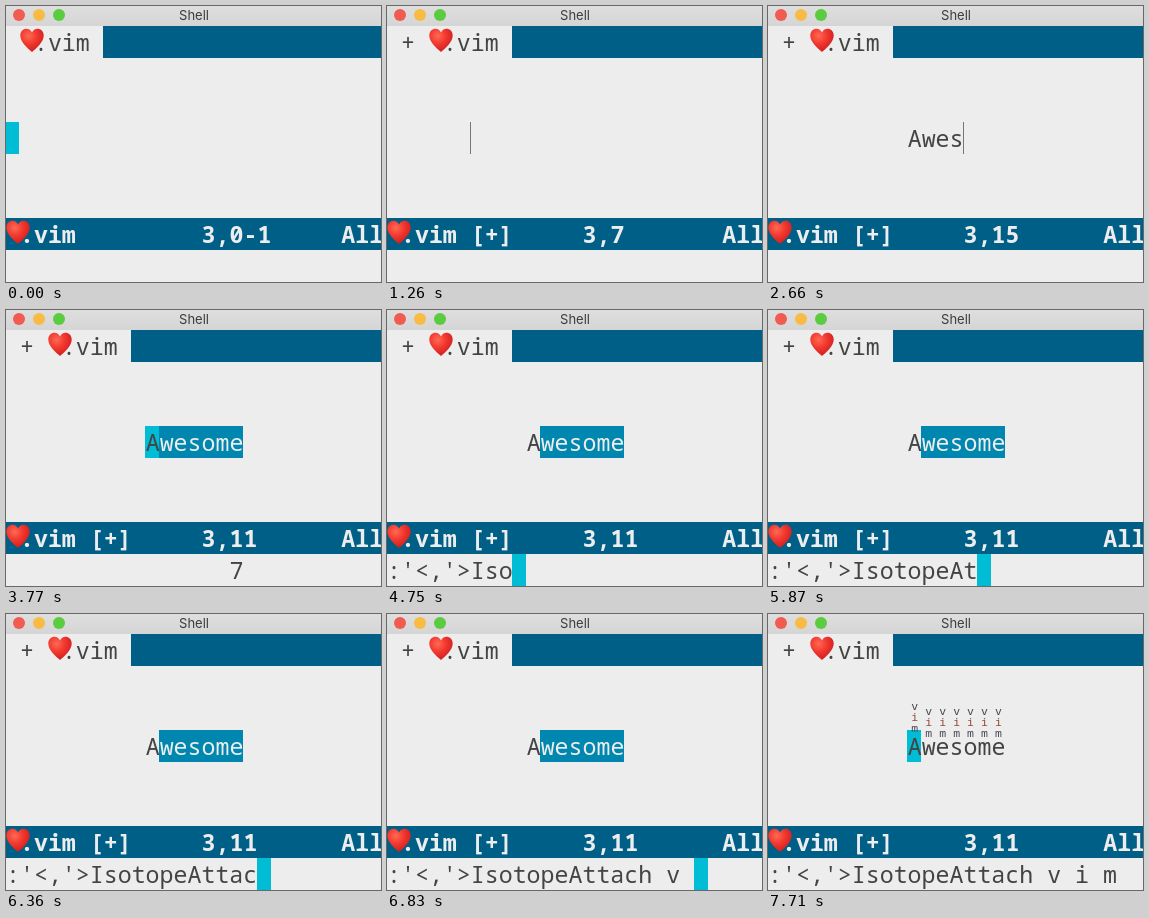
Write an HTML page that moves like this. It is 375 px wide and 276 px high and loops after 8000 ms.

```html
<!DOCTYPE html>
<html lang="en">
<head>
<meta charset="utf-8">
<title>Shell</title>
<style>
html, body { margin: 0; width: 100%; height: 100%; overflow: hidden; background: #ededed; }
svg { display: block; width: 375px; height: 276px; }
text { white-space: pre; fill: #444; }
.mono { font: 300 23.28px "Noto Sans Mono", monospace; }
.bold { font-weight: 700; }
.light { fill: #ededed; }
.title { font: 13px Inter, sans-serif; text-anchor: middle; fill: #3c3c3c; }
.mark { font: 11.5px "Noto Sans Mono", monospace; text-anchor: middle; }
</style>
</head>
<body>
<svg viewBox="0 0 375 276">
  <defs>
    <linearGradient id="bar" x2="0" y2="1">
      <stop stop-color="#dedede"/><stop offset="1" stop-color="#d5d5d5"/>
    </linearGradient>
    <radialGradient id="red" cx=".36" cy=".3" r=".75">
      <stop stop-color="#ff6a55"/><stop offset=".45" stop-color="#f23a30"/><stop offset="1" stop-color="#cf1a1c"/>
    </radialGradient>
    <path id="heart" fill="url(#red)" d="M12 24C8 20.500 .3 14.500 .3 7.500C.3 3.500 3.300 .8 6.500 .8C9 .8 11 2.300 12 4.500C13 2.300 15 .8 17.500 .8C20.700 .8 23.700 3.500 23.700 7.500C23.700 14.500 16 20.500 12 24Z"/>
  </defs>
  <rect width="375" height="276" fill="#ededed"/>
  <rect width="375" height="20" fill="url(#bar)"/>
  <circle cx="13" cy="9" r="6" fill="#f15b51"/>
  <circle cx="33" cy="9" r="6" fill="#f8bb45"/>
  <circle cx="53" cy="9" r="6" fill="#5bcb40"/>
  <text class="title" x="188" y="14">Shell</text>
  <g id="screen"></g>
</svg>
<script>
(() => {
  const LOOP = 8000, CELL = 13.97, ROW = 32, TOP = 20;
  const BLUE = "#005f87", SELECT = "#0087af", CURSOR = "#00bcd4";
  const WORD = "Awesome", COMMAND = "IsotopeAttach v i m";
  const BUFFER = 3, STATUS = 6, PROMPT = 7;

  // Evenly spaced key times, both ends included
  const keys = (from, to, n) =>
    Array.from({ length: n }, (_, i) => from + (to - from) * i / (n - 1));
  const indentKeys = [840, 1050, 1260, 1490, 1730];
  const wordKeys = [...keys(2180, 2660, 4), ...keys(2720, 2960, 3)];
  const commandKeys = [
    ...keys(4450, 4750, 3), ...keys(4960, 5280, 4), 5600, 5870,
    ...keys(6010, 6830, 7), ...keys(7010, 7360, 3)
  ];
  const INSERT = 570, ESCAPE = 3410, VISUAL = 3590, BACK = 3770, COLON = 4180, RUN = 7710;
  const pressed = (list, t) => list.filter(k => t >= k - 0.01).length;

  const colX = col => Math.floor(col * CELL);
  const rowY = row => TOP + row * ROW;

  function fill(row, from, to, color) {
    const x = colX(from);
    return `<rect x="${x}" y="${rowY(row)}" width="${colX(to) - x}" height="${ROW}" fill="${color}"/>`;
  }

  function write(row, col, str, style = "") {
    const safe = str.replace(/</g, "&lt;").replace(/>/g, "&gt;");
    return `<text class="mono ${style}" x="${col * CELL}" y="${rowY(row) + 25}">${safe}</text>`;
  }

  function fileName(row, col, style) {
    return `<use href="#heart" x="${Math.round(col * CELL)}" y="${rowY(row) + 2}"/>` +
      write(row, col + 1, ".vim", style);
  }

  // Small letters stacked above each character of the word
  function marks() {
    const colors = ["#444", "#96503f", "#4a4654"];
    let out = "";
    for (let i = 0; i < WORD.length; i++) {
      const base = i ? 101 : 96;
      [..."vim"].forEach((c, j) => {
        out += `<text class="mark" x="${(10.5 + i) * CELL}" y="${base + j * 11}" style="fill:${colors[j]}">${c}</text>`;
      });
    }
    return out;
  }

  function tabLine(edited) {
    return fill(0, edited ? 9 : 7, 27, BLUE) +
      (edited ? write(0, 1, "+") : "") + fileName(0, edited ? 3 : 1);
  }

  function statusLine(edited, pos) {
    const style = "bold light";
    return fill(STATUS, 0, 27, BLUE) + fileName(STATUS, 0, style) +
      (edited ? write(STATUS, 6, "[+]", style) : "") +
      write(STATUS, 14, pos, style) + write(STATUS, 24, "All", style);
  }

  function buffer(t, col, typed) {
    const text = WORD.slice(0, typed);
    let out = "";
    if (t < INSERT || (t >= ESCAPE && t < COLON) || t >= RUN) {
      out += fill(BUFFER, col, col + 1, CURSOR);
    } else if (t < ESCAPE && col) {
      out += `<rect x="${colX(col)}" y="${rowY(BUFFER)}" width="1" height="${ROW}" fill="#777"/>`;
    }
    if (t >= BACK && t < RUN) {
      out += fill(BUFFER, 11, 17, SELECT) + write(BUFFER, 10, text[0]) +
        write(BUFFER, 11, text.slice(1), "light");
    } else {
      out += write(BUFFER, 10, text);
    }
    return out + (t >= RUN ? marks() : "");
  }

  function prompt(t) {
    if (t < VISUAL) return "";
    if (t < COLON) return write(PROMPT, 16, t < BACK ? "1" : "7");
    const line = ":'<,'>" + COMMAND.slice(0, pressed(commandKeys, t));
    const caret = t < RUN ? fill(PROMPT, line.length, line.length + 1, CURSOR) : "";
    return caret + write(PROMPT, 0, line);
  }

  function render(t) {
    const edited = t >= indentKeys[0];
    const typed = pressed(wordKeys, t);
    let col = 2 * pressed(indentKeys, t) + typed;
    if (t >= ESCAPE) col = t < BACK ? 16 : 10;
    const pos = t < INSERT ? "3,0-1" : "3," + (col + 1);
    return tabLine(edited) + buffer(t, col, typed) + statusLine(edited, pos) + prompt(t);
  }

  const screenEl = document.getElementById("screen");
  const start = performance.now();
  let shown = "";
  function tick() {
    const view = render((performance.now() - start) % LOOP);
    if (view !== shown) screenEl.innerHTML = shown = view;
    requestAnimationFrame(tick);
  }
  tick();
})();
</script>
</body>
</html>
```
